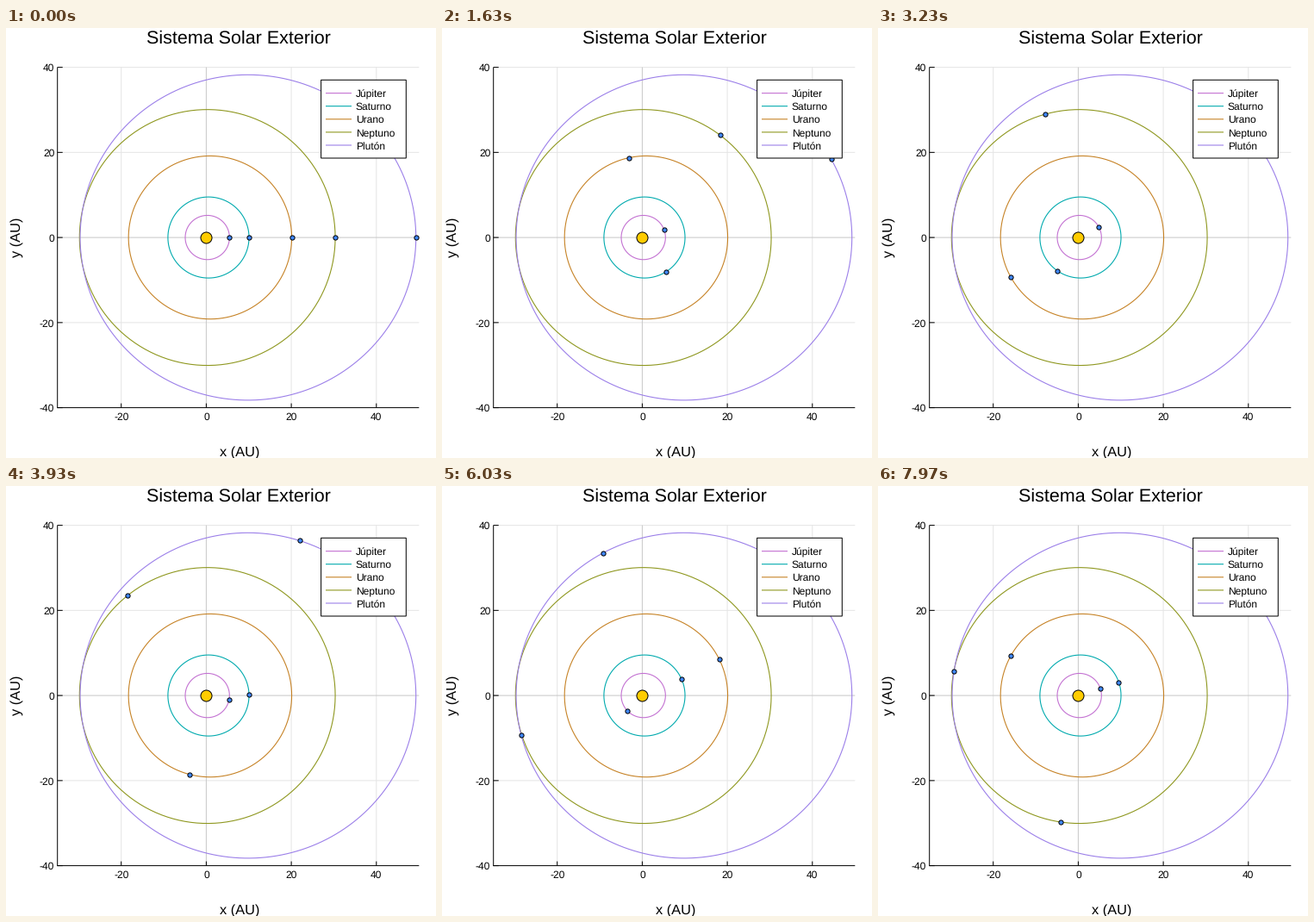
A matplotlib script for the animation above (8 s loop, 499 by 499 pixels).

```python
import numpy as np
import matplotlib.pyplot as plt
from matplotlib.animation import FuncAnimation
from matplotlib.patches import Rectangle

SIZE, DPI = 499, 100
PT = 72 / DPI                      # points per pixel
FRAMES, LOOP_MS = 400, 8000
YEARS_PER_STEP = 0.5               # three steps every five frames

X0, Y0 = 232.4, 243.1              # pixel position of the sun
SX, SY = 4.935, 4.9375             # pixels per AU
LEFT, RIGHT, TOP, BOTTOM = 59.7, 479.3, 45.6, 440.6

# name, semi-major axis (AU), eccentricity, period (years), colour
PLANETS = [
    ("Júpiter", 5.203, 0.0489, 11.884, "#c371d2"),
    ("Saturno", 9.537, 0.0542, 29.46, "#00aaae"),
    ("Urano", 19.19, 0.0472, 84.02, "#c68225"),
    ("Neptuno", 30.07, 0.0086, 164.8, "#8e971e"),
    ("Plutón", 39.48, 0.2488, 248.0, "#9b7fe9"),
]


def to_px(x, y):
    return X0 + SX * x, Y0 - SY * y


def ellipse(a, e, anomaly):
    """Point on an orbit; the anomaly is counted from aphelion."""
    x = a * (np.cos(anomaly) + e)
    y = a * np.sqrt(1 - e * e) * np.sin(anomaly)
    return to_px(x, y)


def position(a, e, period, years):
    mean = 2 * np.pi * (years / period % 1)
    anomaly = mean
    for _ in range(8):
        anomaly -= (anomaly + e * np.sin(anomaly) - mean) / (1 + e * np.cos(anomaly))
    return ellipse(a, e, anomaly)


plt.rcParams.update({
    "font.family": "Liberation Sans",
    "text.hinting": "no_hinting",
    "path.snap": False,
})
fig = plt.figure(figsize=(SIZE / DPI, SIZE / DPI), dpi=DPI, facecolor="white")
ax = fig.add_axes([0, 0, 1, 1])
ax.set_xlim(0, SIZE)
ax.set_ylim(SIZE, 0)
ax.axis("off")


def line(xs, ys, color, z=1, width=1):
    ax.plot(xs, ys, color=color, lw=width * PT, zorder=z, solid_capstyle="butt")


def label(x, y, text, px, ha="center", **kw):
    ax.text(x, y, text, fontsize=px * PT, ha=ha, va="baseline", zorder=8, **kw)


# grid, with darker lines through the origin
for v in (-20, 20, 40):
    gx, gy = to_px(v, v)
    line([gx, gx], [TOP, BOTTOM], "#e5e5e5")
    line([LEFT, RIGHT], [gy, gy], "#e5e5e5")
line([X0, X0], [TOP, BOTTOM], "#c8c8c8")
line([LEFT, RIGHT], [Y0, Y0], "#c8c8c8")

# axes and inward ticks
line([LEFT, LEFT], [TOP, BOTTOM + 0.5], "black", 2)
line([LEFT, RIGHT], [BOTTOM, BOTTOM], "black", 2)
for v in (-20, 0, 20, 40):
    tx = to_px(v, 0)[0]
    line([tx, tx], [BOTTOM - 5, BOTTOM], "black", 2)
    label(tx, 454.5, f"{v}", 12)
for v in (-40, -20, 0, 20, 40):
    ty = to_px(0, v)[1]
    line([LEFT, LEFT + 6], [ty, ty], "black", 2)
    label(56.3, ty + 4.6, f"{v}", 12, "right")

label(270, 18.2, "Sistema Solar Exterior", 21.5)
label(270.7, 497, "x (AU)", 16.4)
label(16.5, 242.7, "y (AU)", 16.4, rotation=90, rotation_mode="anchor")

# orbits
turn = np.linspace(0, 2 * np.pi, 400)
for _, a, e, _, color in PLANETS:
    line(*ellipse(a, e, turn), color, 3, 1.1)

# sun and planets
ax.plot([X0], [Y0], "o", ms=13 * PT, mfc="#ffcc00", mec="black", mew=PT, zorder=4)
dots, = ax.plot([], [], "o", ms=5.2 * PT, mfc="#4088ff", mec="black", mew=PT, zorder=5)

# legend
ax.add_patch(Rectangle((365.6, 60.3), 98.7, 90.7, fc="white", ec="black", lw=PT, zorder=6))
for row, (name, *_, color) in enumerate(PLANETS):
    y = 75.6 + 15.1 * row
    line([371, 401], [y, y], color, 7, 1.1)
    label(405.7, y + 4.5, name, 12, "left")


def update(frame):
    years = (3 * frame + 2) // 5 * YEARS_PER_STEP
    spots = [position(a, e, period, years) for _, a, e, period, _ in PLANETS]
    dots.set_data(*zip(*spots))
    return dots,


anim = FuncAnimation(fig, update, frames=FRAMES, interval=LOOP_MS // FRAMES,
                     repeat=True, repeat_delay=0)
plt.show()
```
